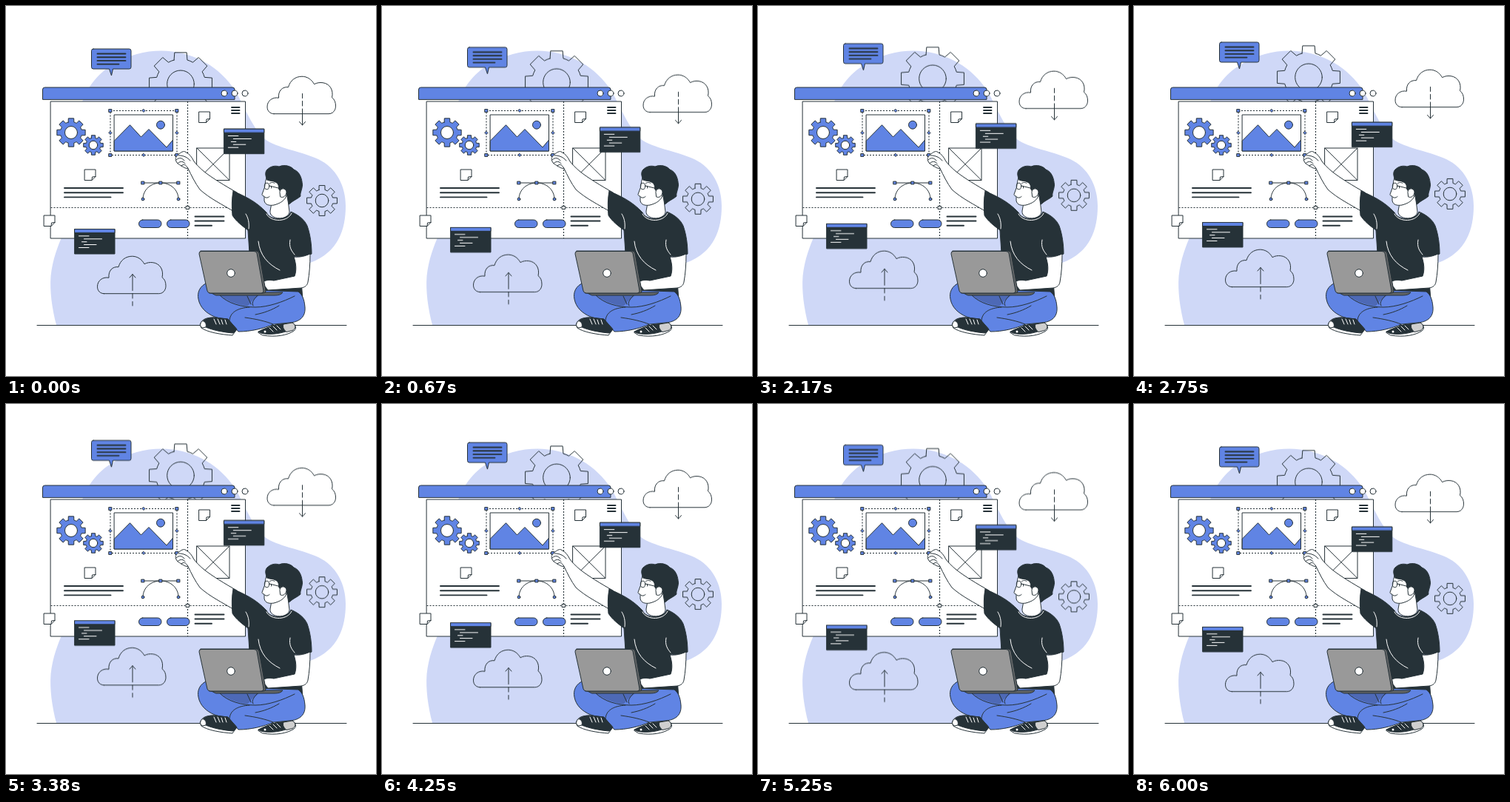
Write an HTML page that moves like this. It is 500 px wide and 500 px high and loops after 6040 ms.

```html
<!DOCTYPE html>
<html lang="en">
<head>
<meta charset="utf-8">
<title>Web design illustration</title>
<style>
  html, body { margin: 0; width: 100%; height: 100%; overflow: hidden; background: #fff; }
  svg { display: block; width: 100%; height: 100%; }
  .ink { stroke: #263238; stroke-width: 1; stroke-linecap: round; stroke-linejoin: round; fill: none; }
  .white { fill: #fff; }
  .blue { fill: #6084e4; }
  .dark { fill: #263238; }
  .thick { stroke-width: 1.9; }
  .dots { stroke-width: 1.1; stroke-linecap: butt; stroke-dasharray: 2 2; }
  .light { stroke: #fff; }
  .float { animation: float 6.04s linear infinite; }
  @keyframes float { 50% { transform: translateY(-10px); } }
</style>
</head>
<body>
<svg viewBox="0 0 500 500">
  <defs>
    <path id="cloud" d="M9 50.5H83C88.500 50.500 92.500 46 92.500 40C92.500 35 91 31 87.500 28.500C90 18 84 9.500 75 8.500C71 8 67 8.500 63.500 10.500C60 4 54 0 47 0C38 0 31 5.500 28.500 14.500C20.500 13.500 14.500 19.500 15.500 29C7 27.500 0 33 0 41C0 47 4 50.500 9 50.500Z"/>
    <path id="note" d="M0 0H14.500V9.500L9.500 14.500H0ZM9.500 14.500L10 10L14.500 9.500"/>
    <g id="panel">
      <path class="dark" d="M0 0H54V33.500H0Z"/>
      <path class="blue" d="M0 0H54V5H0Z"/>
      <path class="light" d="M5.500 9.300H19M12.500 13.300H36.500M9.500 17.200H16M12.500 21H29M5.500 25H19"/>
    </g>
    <path id="handle" d="M-1.900 -1.900H1.900V1.900H-1.900Z"/>
    <path id="diamond" d="M0 -2L2 0L0 2L-2 0Z"/>
  </defs>

  <path fill="#cfd8f7" d="M68 431C62 408 59 385 60.500 365C63 342 70 325 77 308L100 140C106 114 123 91 145 79C165 66 188 60.500 210 60.500C250 61 284 79 306 109C321 130 330 162 350 180C366 192 398 196 422 207C447 219 459 244 459 270C459 302 449 333 411 347C396 352 384 354 375 360C352 382 352 410 330 431Z"/>
  <path class="ink" d="M42 431.500H460"/>

  <g class="ink">
    <g class="float">
      <path data-gear="236 105.300 43.200 33.500"/>
      <circle cx="236" cy="105.300" r="18.300"/>
    </g>
    <g class="float">
      <path data-gear="427 263 20.800 15"/>
      <circle cx="427" cy="263" r="8.800"/>
    </g>
    <g class="float">
      <use href="#cloud" x="353" y="95.200"/>
      <path d="M400.500 118.500V124.500M400.500 128.500V135M400.500 139V161M396.500 156.500L400.500 161L404.500 156.500"/>
    </g>
    <g class="float">
      <use href="#cloud" x="123.500" y="338.200"/>
      <path d="M171 362.500V384.500M171 388.500V395M171 399.500V405M167 367L171 362.500L175 367"/>
    </g>
  </g>

  <!-- browser window -->
  <g class="ink">
    <path class="blue" d="M49.500 126V113Q49.500 110 52.500 110H306Q309 110 309 113V126Z"/>
    <g class="white">
      <circle cx="295" cy="118" r="4"/><circle cx="309" cy="118" r="4"/><circle cx="323" cy="118" r="4"/>
      <path d="M60.500 129H323.500V314H60.500Z"/>
    </g>
    <path class="dots" d="M245.500 129V314M60.500 272.500H323.500"/>
    <path class="white" d="M243.500 270.500H247.500V274.500H243.500Z"/>
    <path class="thick" d="M305 137H315.500M305 141H315.500M305 145H315.500M79 246H158M79 252.200H158M79 258.400H141.500M255.500 284.500H294.500M255.500 290.500H294.500M255.500 296.700H278"/>
    <g class="white">
      <use href="#note" x="261" y="143"/>
      <use href="#note" x="106.500" y="221"/>
      <use href="#note" x="51.500" y="283"/>
      <path d="M258 192H302V235.500H258ZL302 235.500M302 192L258 235.500"/>
    </g>

    <path class="dots" d="M141 141.500H231V201.500H141Z"/>
    <path class="white" d="M146.500 147H225.500V196H146.500Z"/>
    <g class="blue">
      <path d="M146.500 182L167.500 160.700L182.500 177L193 166.500L217 191L225.500 181V196H146.500Z"/>
      <circle cx="209" cy="160.700" r="5.500"/>
      <use href="#handle" x="141" y="141.500"/><use href="#handle" x="231" y="141.500"/>
      <use href="#handle" x="141" y="201.500"/><use href="#handle" x="231" y="201.500"/>
      <use href="#diamond" x="186" y="141.500"/><use href="#diamond" x="186" y="201.500"/>
      <use href="#diamond" x="141" y="171.500"/><use href="#diamond" x="231" y="171.500"/>
      <path data-gear="88 171 19.500 14.500"/>
      <path data-gear="118 188 13.500 10"/>
      <rect x="179.500" y="289" width="30.500" height="10.500" rx="5.200"/>
      <rect x="217.500" y="289" width="30.500" height="10.500" rx="5.200"/>
    </g>
    <g class="white">
      <circle cx="88" cy="171" r="8.500"/><circle cx="118" cy="188" r="5.700"/>
    </g>
    <path d="M185 239H233M185 261C185 248 196 239 209 239S233 248 233 261"/>
    <g class="blue">
      <use href="#handle" x="185" y="239"/><use href="#handle" x="209" y="239"/><use href="#handle" x="233" y="239"/>
      <circle cx="185" cy="261" r="1.900"/><circle cx="233" cy="261" r="1.900"/>
    </g>
  </g>

  <g class="ink">
    <g class="float"><use href="#panel" x="294.800" y="166.200"/></g>
    <g class="float"><use href="#panel" x="93" y="301.500"/></g>
    <g class="float">
      <path class="blue" d="M118 58H166.500Q169 58 169 60.500V82.500Q169 85 166.500 85H144.500L142.500 94L139.500 85H118Q115.500 85 115.500 82.500V60.500Q115.500 58 118 58Z"/>
      <path class="thick" d="M123.500 64.500H161.500M123.500 69.200H161.500M123.500 73.900H161.500M123.500 78.600H152.500"/>
    </g>
  </g>

  <!-- person -->
  <g class="ink">
    <!-- pointing arm -->
    <path class="white" d="M312 252C296 243 278 232 268 224C262 219 257 214 254 210C251 204 248 200 243 197.500C240 195 236 198 232.500 201C229 204 228.500 207 230 210C231 213 234 214 236 215.500C239 217 242 220 246 219.500C250 228 256 240 262 248C275 260 292 268 310 279Z"/>
    <path d="M233 202C238 202 244 203 249 209M230 208C234 204 238 205 241 209M232 212.500C236 209 240 210 242 213M237 216C240 213 243 214 246 219.500"/>

    <!-- neck and face -->
    <path class="white" d="M359 266L357 277C356 290 382 290 383 278L380 255L362 252Z"/>
    <path class="white" d="M353 228C351 235 350 240 349.500 245L346 254.500C346 256.500 348 257 349 257L349 263C350 269 356 270 362 269C370 267 377 263 379 256L380 240L364 231Z"/>
    <path class="dark" d="M353 235C350 229 350 224 353 221C357 217 363 215 369 217C376 214 385 216 389 221C397 224 400 233 400.500 242C400 249 397 253 398 257C395 260 390 262 386 265L382.500 268C381 262 380 257 379 253C378 246 372 246 371 251L368.500 247C369 242 367 239 364 238C361 236 357 237 353 235Z"/>
    <path class="white" d="M370 251C371 245 378 246 379 251C379 256 375 260 371 258Z"/>
    <path d="M350 258.500C352 259.500 354 259.500 356 257.500M356 240C358 238 361 238 363 239.500M358.500 243.500V246M356 243L370 246.500"/>
    <ellipse cx="352.500" cy="243.500" rx="3.200" ry="4.300"/>

    <!-- shirt -->
    <path class="dark" d="M307 250C322 257 337 263 352 279C357 291 381 290 385 278C397 283 404 290 407 297C411 308 413 322 413 335C405 338 397 339 390 338L399 372L401 397L340 392L330 350L327 303C319 297 311 291 306 283C305 272 305 260 307 250Z"/>
    <path class="light" d="M352 281C358 293 381 292 386 280M341 318C343 337 354 349 370 357M384 316C382 326 386 331 390 336M328 301C329 292 327 286 324 281"/>

    <!-- crossed legs -->
    <path class="blue" d="M272 374C262 378 258 387 260 396C262 407 270 415 282 420L302 426L314 440C331 440 347 436 362 430L383 428C398 427 405 419 404 407C403 395 400 390 395 386L340 384L280 380Z"/>
    <path fill="#4d69b6" stroke="none" d="M286 389H345L333 398L327 405C314 405 297 398 286 389Z"/>
    <path d="M289 391C300 402 318 407 337 407C354 407 374 400 390 392M302 426C302 414 313 408 329 407M326 392L331 403M340 391C333 398 332 402 334 405M323 421C338 423 351 426 361 430M369 405C359 411 348 415 337 417"/>

    <!-- shoes -->
    <path class="white" d="M262.500 430C264 423 272 421 280 421L299 423C303 427 309 433 312 437L306 445C291 444 272 441 264 435Z"/>
    <path class="dark" d="M265 427C268 422 275 421 283 421L300 423L312 437L307 442C294 441 279 438 270 434Z"/>
    <path class="white" d="M262.500 431C263 428 264 426 266 425.500C270 427 271 430 270 434L265 435Z"/>
    <path class="light" d="M281 423L284 430M286 423L289 430M291 424L293 430M296 424L298 430"/>
    <path class="white" d="M341 441C347 437 355 434 364 431L387 428C392 431 393 436 389 439C380 445 365 448 347 445Z"/>
    <path class="dark" d="M341 440C348 436 356 434 364 431L379 429L384 438C373 442 360 445 346 442.500Z"/>
    <path fill="#cfcfcf" d="M375 430L387 428C392 431 392 436 387 438.500L379 440.500C376 438 373 434 375 430Z"/>
    <path class="light" d="M356 435L361 440M361 433L366 438M366 432L371 437"/>
    <circle class="white" cx="350" cy="440" r="1.500" stroke="none"/>

    <!-- forearm -->
    <path class="white" d="M389 339C397 340 404 338 411 335C411 349 410 362 408 373C407 378 404 380 399 381L354 384L346 374C350 370 356 370 362 371L390 365C393 357 392 348 389 339Z"/>

    <!-- laptop -->
    <path fill="#626567" d="M276 387H352L374 387C372 390 368 391 362 391L284 391Z"/>
    <path fill="#626567" d="M263 331H338Q341 331 342 334L351 385Q351 388 348 388H275Z"/>
    <path fill="#999" d="M263.500 331.500H335Q338 331.500 339 334L348 385Q348 388 345 388H276Q273 388 272 385L261 335Q260.500 331.500 263.500 331.500Z"/>
    <circle class="white" cx="304" cy="361" r="5.300"/>
  </g>
</svg>
<script>
  const point = (cx, cy, r, a) =>
    `${(cx + r * Math.sin(a)).toFixed(2)} ${(cy - r * Math.cos(a)).toFixed(2)}`;

  function gearPath(cx, cy, outer, root, teeth = 8) {
    const step = 2 * Math.PI / teeth, top = 0.19, base = 0.27;
    let d = "";
    for (let i = 0; i < teeth; i++) {
      const a = i * step;
      d += (i ? `A${root} ${root} 0 0 1 ` : "M") + point(cx, cy, root, a - base)
        + "L" + point(cx, cy, outer, a - top)
        + "L" + point(cx, cy, outer, a + top)
        + "L" + point(cx, cy, root, a + base);
    }
    return d + `A${root} ${root} 0 0 1 ${point(cx, cy, root, -base)}Z`;
  }

  for (const gear of document.querySelectorAll("[data-gear]"))
    gear.setAttribute("d", gearPath(...gear.dataset.gear.split(" ").map(Number)));
</script>
</body>
</html>
```
